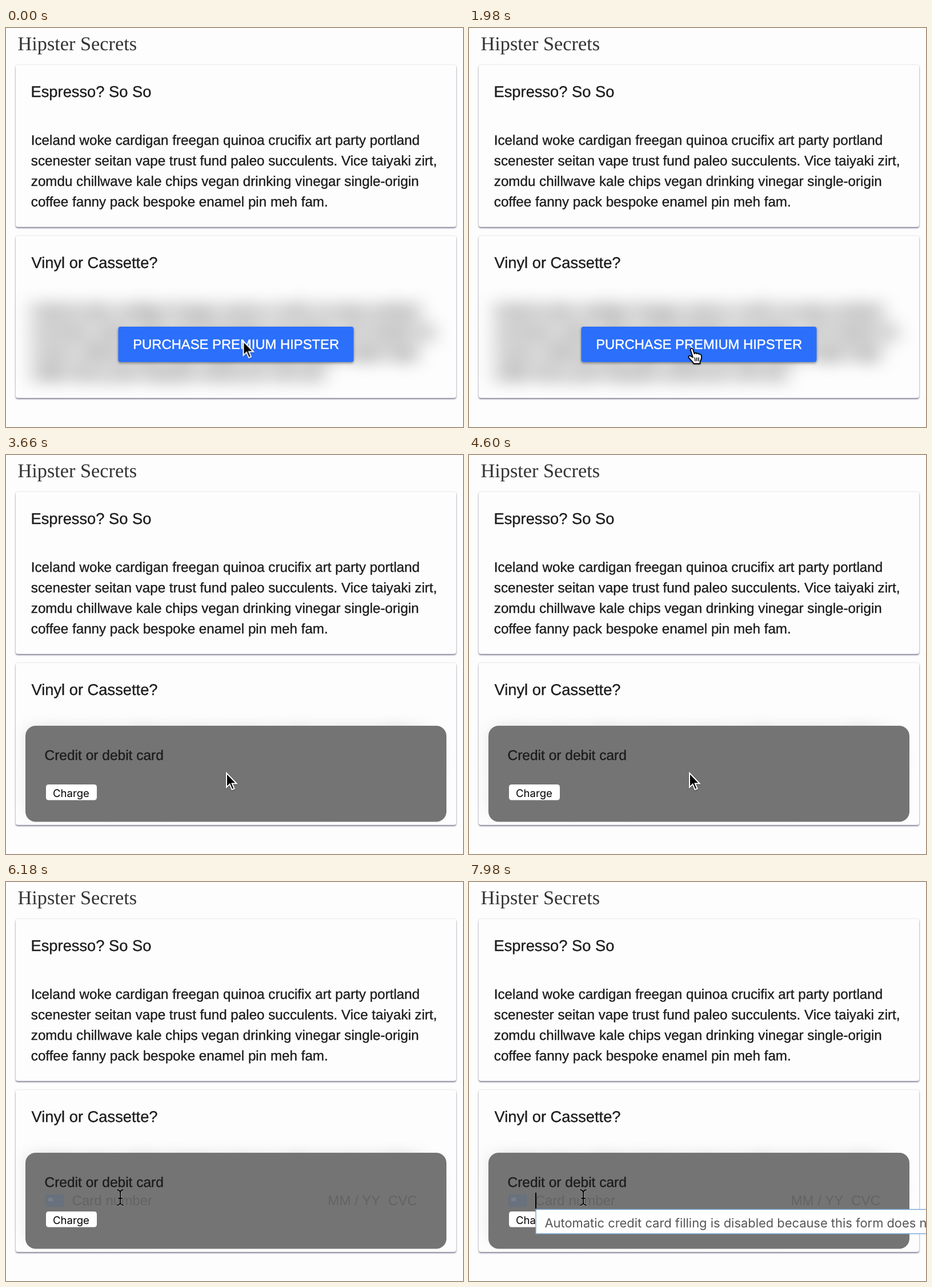
Recreate the animation shown at these times as an HTML page. Size 800 px wide and 700 px high, loop 8 s.

```html
<!DOCTYPE html>
<html lang="en">
<head>
<meta charset="utf-8">
<title>Hipster Secrets</title>
<style>
  html, body { margin: 0; width: 100%; height: 100%; overflow: hidden; background: #fdfdfd; }
  svg { display: block; width: 800px; height: 700px; text-rendering: geometricPrecision; }
  text { font-family: "Liberation Sans", Arial, sans-serif; fill: #1c1c1c; }
  .page-title { font: 34.3px "Liberation Serif", Times, serif; fill: #333; }
  .heading { font-size: 27.3px; }
  .copy { font-size: 24.2px; }
  .heading, .copy, .label { stroke: #1c1c1c; stroke-width: .35px; }
  .card { fill: #fdfdfd; filter: drop-shadow(0 2.5px 1px rgba(60, 60, 90, .55)) drop-shadow(0 0 1.5px rgba(60, 60, 110, .2)); }
  .secret { filter: blur(16px); }
  .secret text { fill: #000; stroke: #000; stroke-width: .5px; }
  .buy rect { fill: #2b6ffb; filter: drop-shadow(0 2px 2px rgba(0, 0, 0, .4)); }
  .buy text { font-size: 23.8px; fill: #fff; stroke: #fff; stroke-width: .45px; text-anchor: middle; }
  .label { font-size: 24.5px; }
  .field text { font-size: 24.1px; fill: #626365; }
  .system { font-family: Inter, Roboto, sans-serif; }
  .pointer { filter: drop-shadow(0 1px 1px rgba(0, 0, 0, .35)); }
</style>
</head>
<body>
<svg viewBox="0 0 800 700">
  <text class="page-title" x="20.5" y="39">Hipster Secrets</text>

  <rect class="card" x="17" y="65" width="771" height="284" rx="4"/>
  <text class="heading" x="43.5" y="121">Espresso? So So</text>
  <g id="story"></g>

  <rect class="card" x="17" y="365" width="771" height="284" rx="4"/>
  <text class="heading" x="44.5" y="421">Vinyl or Cassette?</text>
  <g id="secret" class="secret"></g>

  <g id="buy" class="buy">
    <rect x="196.5" y="524" width="412" height="62" rx="4"/>
    <text x="402.7" y="563">PURCHASE PREMIUM HIPSTER</text>
  </g>

  <g id="dialog" opacity="0">
    <rect x="34" y="475" width="737" height="168.5" rx="18" fill="#747474"/>
    <text class="label" x="67.5" y="534.5">Credit or debit card</text>
    <g id="number" class="field">
      <rect x="69" y="548" width="32" height="22" rx="3" fill="#68717d"/>
      <rect x="74" y="554" width="8" height="6" rx="1" fill="#77808a"/>
      <text x="115.5" y="567">Card number</text>
    </g>
    <g id="expiry" class="field">
      <text x="563.5" y="567">MM / YY</text>
      <text x="669" y="567">CVC</text>
    </g>
    <rect x="70" y="578" width="89" height="27.5" rx="4.5" fill="#fff"/>
    <text class="system" x="82" y="599.5" font-size="18.6" style="fill:#000">Charge</text>
  </g>

  <g id="hint" opacity="0">
    <rect x="116" y="545" width="2" height="28" fill="#000"/>
    <rect x="117" y="574.5" width="720" height="42.5" fill="#fff" stroke="#7fabd6" stroke-width="1.5"/>
    <text class="system" x="132.5" y="605.5" font-size="21.9" style="fill:#555">Automatic credit card filling is disabled because this form does not</text>
  </g>

  <g id="cursor">
    <path id="arrow" class="pointer" d="M0 0V25L5.6 19.6L9.6 29L13.6 27.3L9.7 18.2H17.5Z"
      fill="#000" stroke="#fff" stroke-width="2"/>
    <g id="hand" class="pointer" transform="translate(-7 4)" opacity="0" stroke="#000" stroke-width="1.8" stroke-linecap="round" stroke-linejoin="round">
      <path fill="#fff" d="M9 17L5 4.5C4 .5 8 -.2 9 3L11.5 10.5C12 8.5 15 8.5 15.5 10.5C16.5 9 19 9.5 19.5 11.5C21 10.5 23.5 11.5 23.8 14C24.5 18 23.5 21 21.5 24V28H10.5C9 24 5 21.5 2.3 18C0 15 3 13 5 14.5Z"/>
      <path fill="none" stroke-width="1.5" d="M12.3 17.5L13 23M15.8 17.5V23M19.2 17.5L19 23"/>
    </g>
    <g id="beam" opacity="0" fill="none" stroke-linecap="round">
      <path d="M-5 -13Q0 -12 0 -8Q0 -12 5 -13M0 -8V9M-5 14Q0 13 0 9Q0 13 5 14M-3 2H3" stroke="#d4d4d4" stroke-width="3.2" stroke-opacity=".55"/>
      <path d="M-5 -13Q0 -12 0 -8Q0 -12 5 -13M0 -8V9M-5 14Q0 13 0 9Q0 13 5 14M-3 2H3" stroke="#000" stroke-width="1.8"/>
    </g>
  </g>
</svg>
<script>
const LOOP = 8000;
const HOVERED = 960, OPENED = 3640, BEAM = 5300, FOCUSED = 7260;
const byId = id => document.getElementById(id);

const copy = [
  'Iceland woke cardigan freegan quinoa crucifix art party portland',
  'scenester seitan vape trust fund paleo succulents. Vice taiyaki zirt,',
  'zomdu chillwave kale chips vegan drinking vinegar single-origin',
  'coffee fanny pack bespoke enamel pin meh fam.'
];

function addCopy(parent, top) {
  copy.forEach((line, i) => {
    const text = document.createElementNS('http://www.w3.org/2000/svg', 'text');
    text.setAttribute('class', 'copy');
    text.setAttribute('x', 43.8);
    text.setAttribute('y', top + 35.9 * i);
    text.textContent = line;
    parent.append(text);
  });
}

function loop(id, frames) {
  byId(id).animate(frames.map(({ at, ...rest }) => ({ offset: at / LOOP, ...rest })),
    { duration: LOOP, iterations: Infinity });
}

// Hard on/off switching: each step is [time, opacity].
function toggle(id, steps) {
  const last = steps[steps.length - 1][1];
  loop(id, [...steps, [LOOP, last]]
    .map(([at, opacity]) => ({ at, opacity, easing: 'steps(1, end)' })));
}

function fadeIn(id, from, to) {
  loop(id, [
    { at: 0, opacity: 0 }, { at: from, opacity: 0 },
    { at: to, opacity: 1 }, { at: LOOP, opacity: 1 }
  ]);
}

addCopy(byId('story'), 205);
addCopy(byId('secret'), 505);

toggle('buy', [[0, 1], [OPENED, 0]]);
toggle('dialog', [[0, 0], [OPENED, 1]]);
toggle('hint', [[0, 0], [FOCUSED, 1]]);
fadeIn('number', 5350, 5700);
fadeIn('expiry', 5580, 5900);

toggle('arrow', [[0, 1], [HOVERED, 0], [OPENED, 1], [BEAM, 0]]);
toggle('hand', [[0, 0], [HOVERED, 1], [OPENED, 0]]);
toggle('beam', [[0, 0], [BEAM, 1]]);

// Each step: time, x, y and the easing towards the next one.
const path = [
  [0, 415.5, 549.5, 'linear'], [900, 415.5, 549.5, 'ease-in-out'],
  [1500, 390, 557, 'linear'], [2400, 390, 557, 'ease-in-out'],
  [3000, 386, 558, 'linear'], [5050, 386, 558, 'ease-in'],
  [5580, 251, 553, 'ease-out'], [6050, 200, 553, 'linear'],
  [LOOP, 200, 553, 'linear']
];
loop('cursor', path.map(([at, x, y, easing]) =>
  ({ at, transform: `translate(${x}px, ${y}px)`, easing })));
</script>
</body>
</html>
```
